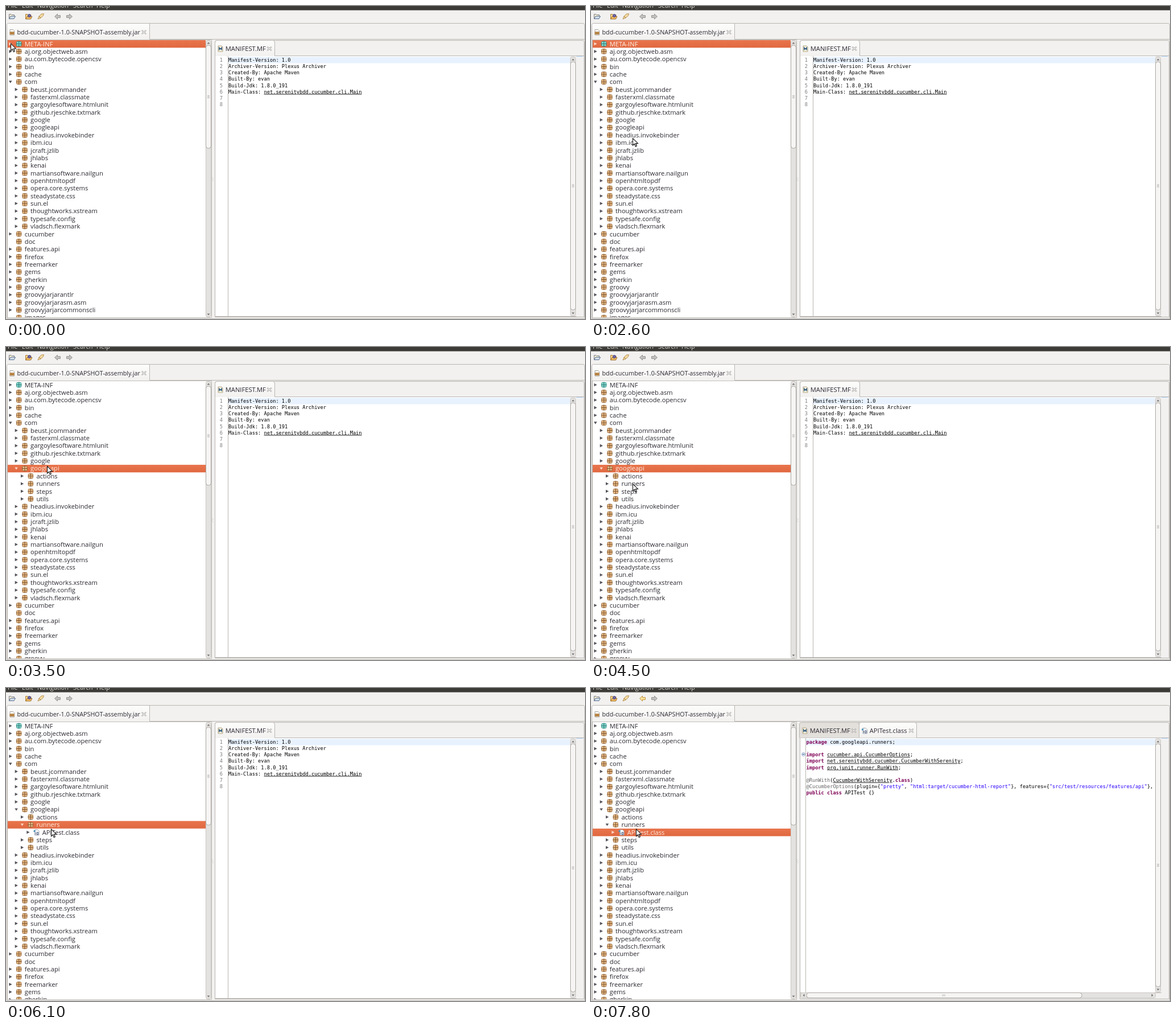
An HTML page for the animation above (8 s loop, 1018 by 550 pixels).

```html
<!DOCTYPE html>
<html lang="en">
<head>
<meta charset="utf-8">
<title>Class browser</title>
<style>
html, body { margin: 0; width: 100%; height: 100%; overflow: hidden; background: #f2f1f0; }
svg { display: block; width: 100%; height: 100%; }
text { font-family: "Open Sans", "Noto Sans", sans-serif; font-size: 11.17px; white-space: pre; }
.ui { fill: #2c2831; }
.menu { fill: #dfdbd2; font-size: 11px; }
.code text { font-family: "DejaVu Sans Mono", monospace; font-size: 8.66px; fill: #000; }
.code .num { fill: #7c7c7c; text-anchor: end; }
.u { text-decoration: underline; }
.k { fill: #7f0055; font-weight: bold; }
.s { fill: #2a00ff; }
.a { fill: #646464; }
.row { fill: #2c2831; }
.line { fill: none; stroke: #bab6b1; }

/* One 8 s clock; every change is a hard cut unless a keyframe sets steps() */
.anim { animation: 8s step-end infinite; }
#cursor { animation-name: cursor; }
#sel { animation-name: select; }
.pick-meta { animation-name: pick-meta; }
.pick-api { animation-name: pick-api; }
.pick-runners { animation-name: pick-runners; }
.pick-class { animation-name: pick-class; }
.api-shut { animation-name: api-shut; }
.api-open { animation-name: api-open; }
.run-shut { animation-name: run-shut; }
.run-open { animation-name: run-open; }
.lower { animation-name: lower; }
.tail { animation-name: tail; }
#treeThumb { animation-name: thumb; }
#treeGrip { animation-name: grip; }
#manifest { animation-name: manifest; }
#source { animation-name: source; }
#fold { animation-name: fold; }
#back { animation-name: back; }

@keyframes cursor {
  0% { transform: translate(8px, 65.5px); }
  5% { transform: translate(8px, 65.5px); animation-timing-function: steps(6); }
  12.5% { transform: translate(40px, 145px); }
  13.75% { transform: translate(44px, 148px); }
  15% { transform: translate(48px, 147px); }
  16.25% { transform: translate(45.5px, 144.5px); }
  20% { transform: translate(45.5px, 144.5px); animation-timing-function: steps(4); }
  25% { transform: translate(70px, 245px); }
  28.75% { transform: translate(70px, 245px); animation-timing-function: steps(3); }
  32.5% { transform: translate(73px, 232px); animation-timing-function: steps(4); }
  37.5% { transform: translate(72px, 209px); }
  50% { transform: translate(72px, 209px); animation-timing-function: steps(3); }
  53.75% { transform: translate(75.5px, 230px); animation-timing-function: steps(2); }
  56.25% { transform: translate(73px, 240px); }
  71.25% { transform: translate(73px, 240px); animation-timing-function: steps(4); }
  76.25% { transform: translate(79px, 247.5px); }
}
@keyframes select {
  0% { transform: translateY(0); }
  40% { transform: translateY(146.96px); }
  62.5% { transform: translateY(173.68px); }
  92.5% { transform: translateY(187.04px); }
}
@keyframes pick-meta { 0% { fill: #fff1e6; } 40% { fill: #2c2831; } }
@keyframes pick-api { 0% { fill: #2c2831; } 40% { fill: #fff1e6; } 62.5% { fill: #2c2831; } }
@keyframes pick-runners { 0% { fill: #2c2831; } 62.5% { fill: #fff1e6; } 92.5% { fill: #2c2831; } }
@keyframes pick-class { 0% { fill: #2c2831; } 92.5% { fill: #fff1e6; } }
@keyframes api-shut { 0% { visibility: visible; } 43.75% { visibility: hidden; } }
@keyframes api-open { 0% { visibility: hidden; } 43.75% { visibility: visible; } }
@keyframes run-shut { 0% { visibility: hidden; } 43.75% { visibility: visible; } 65% { visibility: hidden; } }
@keyframes run-open { 0% { visibility: hidden; } 65% { visibility: visible; } }
@keyframes lower {
  0% { visibility: hidden; transform: translateY(0); }
  43.75% { visibility: visible; transform: translateY(0); }
  65% { visibility: visible; transform: translateY(13.36px); }
}
@keyframes tail {
  0% { transform: translateY(0); }
  43.75% { transform: translateY(53.44px); }
  65% { transform: translateY(66.8px); }
}
@keyframes thumb { 0% { height: 181px; } 43.75% { height: 174px; } 65% { height: 172px; } }
@keyframes grip {
  0% { transform: translateY(0); }
  43.75% { transform: translateY(-3.5px); }
  65% { transform: translateY(-4.5px); }
}
@keyframes manifest { 0% { visibility: visible; } 80% { visibility: hidden; } }
@keyframes source { 0% { visibility: hidden; } 80% { visibility: visible; } }
@keyframes fold { 0% { visibility: hidden; } 97.5% { visibility: visible; } }
@keyframes back { 0% { fill: #c4c2c0; stroke: #8f8d8b; } 92.5% { fill: #fbe3a0; stroke: #b98a2c; } }
</style>
</head>
<body>
<svg viewBox="0 0 1018 550">
  <defs>
    <linearGradient id="orange" x2="0" y2="1">
      <stop stop-color="#e9754d"/><stop offset="1" stop-color="#e06840"/>
    </linearGradient>
    <linearGradient id="tabFill" x2="0" y2="1">
      <stop stop-color="#fdfdfc"/><stop offset="1" stop-color="#f2f1f0"/>
    </linearGradient>
    <clipPath id="treeClip"><path d="M3 60H351V547H3Z"/></clipPath>
    <clipPath id="codeClip"><path d="M368 88H992V545H368Z"/></clipPath>
    <g id="package">
      <rect x="-4" y="-4" width="8" height="8" rx="1" fill="#e6bd8a" stroke="#9a6a3c"/>
      <path d="M0 -5V5M-5 0H5" stroke="#85572e" stroke-width="1.1"/>
    </g>
    <g id="folder">
      <rect x="-4" y="-4" width="8" height="8" rx="1" fill="#8fd8cc" stroke="#2f8f8a"/>
      <path d="M0 -5V5M-5 0H5" stroke="#237c7a" stroke-width="1.1"/>
    </g>
    <g id="class">
      <path d="M-3 -4.5H2L4.5 -2V5H-3Z" fill="#fff" stroke="#8a8f9c" stroke-width=".8"/>
      <path d="M-1.5 0V4M.8 0H3V4H.8Z" fill="none" stroke="#33466e" stroke-width=".9"/>
      <circle cx="-3.4" cy="-2" r="1.8" fill="#4f93b8"/>
    </g>
    <g id="jar">
      <path d="M-3.5 -4.5H2L4 -2.5V5H-3.5Z" fill="#fff" stroke="#8d8a86" stroke-width=".8"/>
      <rect x="-3.6" y="-.6" width="7.4" height="4.4" rx="1" fill="#e3a557" stroke="#93652d" stroke-width=".6"/>
      <path d="M-1.8 .5V2.8M0 .5V2.8M1.8 .5V2.8" stroke="#5f3e17" stroke-width=".8"/>
    </g>
    <g id="doc">
      <path d="M-4 -5H2L4 -3V5H-4Z" fill="#fff8e2" stroke="#a08e66" stroke-width=".8"/>
      <path d="M-2.2 2.8V-1.8L0 .8L2.2 -1.8V2.8" fill="none" stroke="#29557e" stroke-width="1.4"/>
    </g>
    <path id="close" d="M-3 -3.5L0 -1L3 -3.5L4 -2.5L1.3 0L4 2.5L3 3.5L0 1L-3 3.5L-4 2.5L-1.3 0L-4 -2.5Z" fill="#fff" stroke="#7b7977" stroke-width=".7"/>
    <path id="shut" d="M-2.4 -2.8L2.8 0L-2.4 2.8Z" fill-opacity=".8"/>
    <path id="open" d="M-2.8 -2L2.8 -2L0 2.4Z" fill-opacity=".8"/>
  </defs>

  <rect width="1018" height="550" fill="#f2f1f0"/>
  <rect width="1018" height="7.5" fill="#3c3b37"/>
  <g id="menu"></g>

  <g stroke-width=".9">
    <path d="M5.5 22.5V14.5H9L10 15.5H14.5V18" fill="#f3ead0" stroke="#6b7280"/>
    <path d="M5.5 22.5L8 18H16.5L14 22.5Z" fill="#d3deea" stroke="#4b6485"/>
    <path d="M34.5 23V14.5H38L39 15.5H44V18" fill="#f5d58a" stroke="#a7752c"/>
    <path d="M34.5 23L37 18.5H46L43.5 23Z" fill="#f0bb60" stroke="#96652a"/>
    <circle cx="41" cy="17" r="2.6" fill="#7066a8" stroke="#4a437c"/>
    <path d="M56 23L58 18L62 14L66.5 13.5L65.5 17L61 21Z" fill="#f5d9a0" stroke="#b08a4b"/>
    <path d="M58 18L61 21" stroke="#8d6a29"/>
    <path id="back" class="anim" d="M85.5 18.5L90.5 14V16.6H95.5V20.4H90.5V23Z"/>
    <path d="M116.5 18.5L111.5 14V16.6H106.5V20.4H111.5V23Z" fill="#c4c2c0" stroke="#8f8d8b"/>
  </g>

  <path class="line" d="M1.5 549.5V33.5Q1.5 30.5 4.5 30.5H1014.5Q1017.5 30.5 1017.5 33.5V549.5Z"/>
  <path d="M2 58.5V34Q2 31 5 31H250Q252.5 31 252.5 34V58.5Z" fill="url(#tabFill)"/>
  <path class="line" d="M252.5 31V58.5H1017"/>
  <use href="#jar" x="10.5" y="46"/>
  <text class="ui" x="19.5" y="49.7" style="font-size:10.75px">bdd-cucumber-1.0-SNAPSHOT-assembly.jar</text>
  <use href="#close" x="242.5" y="46"/>

  <rect x="2.5" y="59.5" width="359" height="488" fill="#fff" stroke="#c4c0bb"/>
  <g clip-path="url(#treeClip)">
    <rect id="sel" class="anim" x="3" y="60" width="348" height="13.3" fill="url(#orange)"/>
    <g id="tree"></g>
  </g>
  <g id="treeBar"></g>
  <g fill="#b5b2ae"><circle cx="362" cy="301" r=".6"/><circle cx="364" cy="303" r=".6"/><circle cx="362" cy="305" r=".6"/><circle cx="364" cy="307" r=".6"/></g>

  <path class="line" d="M367.5 546.5V63.5Q367.5 60.5 370.5 60.5H1014Q1016.5 60.5 1016.5 63.5V546.5Z"/>
  <g id="manifest" class="anim"></g>
  <g id="source" class="anim"></g>

  <path id="cursor" class="anim" d="M.5 .5V13L3.4 10.3L5.3 14.9L7.4 14L5.4 9.6L9.5 9.4Z" fill="#fff" stroke="#111" stroke-width="1.1"/>
</svg>

<script>
const ROW = 13.36, TOP = 66.5, INDENT = 10.3, LINE = 11.13;
const fill = (id, html) => { document.getElementById(id).innerHTML = html; };
const use = (id, x, y, cls = "") => `<use href="#${id}" x="${x}" y="${y}" class="${cls}"/>`;
const label = (x, y, str, cls = "ui") => `<text class="${cls}" x="${x}" y="${y}">${str}</text>`;

// Tree
function row(i, level, name, { arrow = "shut", icon = "package", cls = "", arrows } = {}) {
  const y = TOP + i * ROW, x = level * INDENT;
  const marks = arrows || (arrow ? use(arrow, 7.8 + x, y) : "");
  return `<g class="row ${cls}">${marks}${use(icon, 22.7 + x, y)}${label(32.8 + x, y + 4, name, "")}</g>`;
}
const rows = (start, level, names) => names.split(" ").map((name, k) =>
  row(start + k, level, name, { arrow: /^(doc|images)$/.test(name) ? "" : "shut" })).join("");
const toggle = (i, level, key) => ["shut", "open"].map(state =>
  use(state, 7.8 + level * INDENT, TOP + i * ROW, `anim ${key}-${state}`)).join("");

fill("tree",
  row(0, 0, "META-INF", { icon: "folder", cls: "anim pick-meta" }) +
  rows(1, 0, "aj.org.objectweb.asm au.com.bytecode.opencsv bin cache") +
  row(5, 0, "com", { arrow: "open" }) +
  rows(6, 1, "beust.jcommander fasterxml.classmate gargoylesoftware.htmlunit github.rjeschke.txtmark google") +
  row(11, 1, "googleapi", { arrows: toggle(11, 1, "api"), cls: "anim pick-api" }) +
  `<g class="anim api-open">${rows(12, 2, "actions")}` +
  row(13, 2, "runners", { arrows: toggle(13, 2, "run"), cls: "anim pick-runners" }) + "</g>" +
  `<g class="anim run-open">${row(14, 3, "APITest.class", { icon: "class", cls: "anim pick-class" })}</g>` +
  `<g class="anim lower">${rows(14, 2, "steps utils")}</g>` +
  `<g class="anim tail">` +
  rows(12, 1, "headius.invokebinder ibm.icu jcraft.jzlib jhlabs kenai martiansoftware.nailgun openhtmltopdf " +
    "opera.core.systems steadystate.css sun.el thoughtworks.xstream typesafe.config vladsch.flexmark") +
  rows(25, 0, "cucumber doc features.api firefox freemarker gems gherkin groovy groovyjarjarantlr " +
    "groovyjarjarasm.asm groovyjarjarcommonscli images") + "</g>");

// Scrollbars
const BAR = 'fill="#e4e2e0" stroke="#c9c6c2"', THUMB = 'rx="4" fill="#f6f5f4" stroke="#aaa6a1"';
const gripV = (x, y, attrs = "") =>
  `<path ${attrs} d="M${x - 2} ${y - 2}h4m-4 2h4m-4 2h4" stroke="#aaa6a1" stroke-width=".8"/>`;
const tip = (x, y, turn) =>
  `<path transform="translate(${x} ${y}) rotate(${turn})" d="M-2.5 1.5L0 -1.5L2.5 1.5Z" fill="#777"/>`;
function vbar(x, top, bottom, thumbTop, thumbBottom, id = "") {
  const mid = (thumbTop + thumbBottom) / 2;
  return `<rect x="${x + .5}" y="${top + .5}" width="9" height="${bottom - top - 1}" rx="3" ${BAR}/>` +
    `<rect ${id && `id="${id}Thumb" class="anim"`} x="${x + .5}" y="${thumbTop}" width="9" height="${thumbBottom - thumbTop}" ${THUMB}/>` +
    gripV(x + 5, mid, id && `id="${id}Grip" class="anim"`) +
    tip(x + 5, top + 5, 0) + tip(x + 5, bottom - 5, 180);
}
const hbar = `<rect x="368.5" y="535.5" width="624" height="9" rx="3" ${BAR}/>` +
  `<rect x="379" y="535.5" width="484" height="9" ${THUMB}/>` +
  `<path d="M618 538.5v3m2 -3v3m2 -3v3" stroke="#aaa6a1" stroke-width=".8"/>` +
  tip(374, 540, -90) + tip(987, 540, 90);
fill("treeBar", vbar(351, 60, 547, 69, 250, "tree"));

// Editors
const tab = (x, right, icon, name, active) =>
  `<path d="M${x + .5} 87.5V64Q${x + .5} 60.5 ${x + 4} 60.5H${right - 3}Q${right + .5} 60.5 ${right + .5} 64V87.5" ` +
  `fill="${active ? "url(#tabFill)" : "#e3e0dc"}" stroke="#bab6b1"/>` +
  use(icon, x + 10, 75) + label(x + 18.8, 78.7, name) + use("close", right - 9, 75);
const page = (x, bottom) =>
  `<rect x="368" y="88" width="624" height="${bottom - 88}" fill="#fff"/>` +
  `<rect x="${x}" y="89.3" width="${992 - x}" height="11.2" fill="#e8f2fe"/>` +
  `<path class="line" d="M${x - .5} 88V${bottom}M368 ${bottom + .5}H1003"/>` +
  `<path d="M1003 88.5H1014" stroke="#b8d3f0"/><path d="M1003 89.5H1014" stroke="#e8f2fe"/>`;
const code = (x, lines, cls = "") => `<g class="code" clip-path="url(#codeClip)">` +
  lines.map((str, i) => label(x, 98 + i * LINE, str, cls)).join("") + "</g>";
const span = cls => str => `<tspan class="${cls}">${str}</tspan>`;
const [u, k, s, a] = ["u", "k", "s", "a"].map(span);

fill("manifest",
  `<path class="line" d="M472 87.5H1016"/>` + tab(367, 472, "doc", "MANIFEST.MF", true) +
  page(391, 545) + code(381, [1, 2, 3, 4, 5, 6, 7, 8], "num") +
  code(391, [
    "Manifest-Version: 1.0",
    "Archiver-Version: Plexus Archiver",
    "Created-By: Apache Maven",
    "Built-By: evan",
    "Build-Jdk: 1.8.0_191",
    "Main-Class: " + u("net.serenitybdd.cucumber.cli.Main"),
  ]) + vbar(992, 89, 545, 98, 534));

fill("source",
  `<path class="line" d="M368 87.5H1016"/>` + tab(366, 471, "doc", "MANIFEST.MF", false) +
  tab(471, 572, "class", "APITest.class", true) + page(378, 535) +
  code(378.5, [
    k("package") + " com.googleapi.runners;",
    "",
    k("import") + " " + u("cucumber.api.CucumberOptions") + ";",
    k("import") + " " + u("net.serenitybdd.cucumber.CucumberWithSerenity") + ";",
    k("import") + " " + u("org.junit.runner.RunWith") + ";",
    "",
    a("@RunWith") + "(" + u("CucumberWithSerenity") + "." + k("class") + ")",
    a("@CucumberOptions") + "(plugin={" + s('"pretty"') + ", " + s('"html:target/cucumber-html-report"') +
      "}, features={" + s('"src/test/resources/features/api"') + "},",
    k("public class") + " APITest {}",
  ]) + vbar(992, 89, 535, 98, 525) + hbar +
  `<g id="fold" class="anim"><circle cx="373.5" cy="116.5" r="3" fill="#dfe8f4" stroke="#8299bd" stroke-width=".8"/>` +
  `<path d="M371.7 116.5H375.3" stroke="#3c5a8a"/></g>`);

fill("menu", [["File", 3], ["Edit", 28], ["Navigation", 55], ["Search", 118], ["Help", 159]]
  .map(([name, x]) => label(x, 2.6, name, "menu")).join(""));
</script>
</body>
</html>
```
